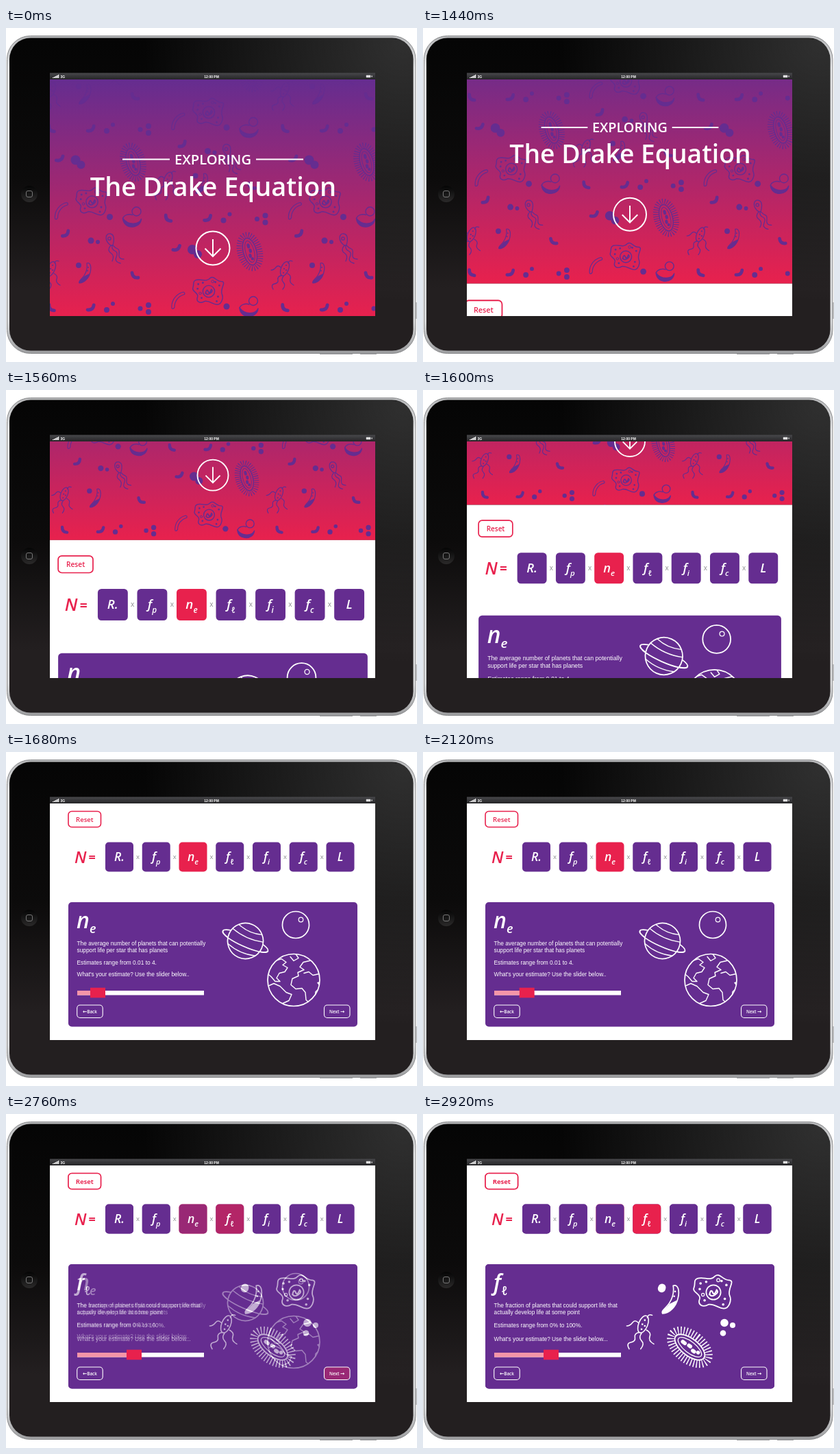
Animation of 600 by 487 pixels, one loop 3880 ms. Source, as an HTML page:

```html
<!DOCTYPE html>
<html lang="en">
<head>
<meta charset="utf-8">
<title>Exploring the Drake Equation</title>
<style>
  html, body { margin: 0; width: 100%; height: 100%; overflow: hidden; background: #fff; }
  svg { display: block; width: 100%; height: 100%; font-family: "Open Sans", "Noto Sans", sans-serif; }
  .line { fill: none; stroke: currentColor; stroke-linecap: round; stroke-linejoin: round; }
  .mid { text-anchor: middle; }
  .math { font-style: italic; font-weight: 600; fill: #fff; }
  .copy { font: 8.35px "Liberation Sans", Arial, sans-serif; fill: #fff; }
  .arrow { font-family: "DejaVu Sans", sans-serif; font-size: 7.5px; }
</style>
</head>
<body>
<svg viewBox="0 0 600 487">
  <defs>
    <linearGradient id="sky" x2="0" y2="1"><stop stop-color="#652d90"/><stop offset="1" stop-color="#e8214d"/></linearGradient>
    <linearGradient id="steel" x2="0" y2="1"><stop stop-color="#b4b5b7"/><stop offset=".1" stop-color="#e4e5e6"/><stop offset=".9" stop-color="#d8d9da"/><stop offset="1" stop-color="#9c9d9f"/></linearGradient>
    <linearGradient id="glass" x2="0" y2="1"><stop stop-color="#050505"/><stop offset=".45" stop-color="#0c0b0b"/><stop offset=".8" stop-color="#231f20"/></linearGradient>
    <radialGradient id="gloss" gradientUnits="userSpaceOnUse" cx="580" cy="20" r="380"><stop stop-color="#fff" stop-opacity=".17"/><stop offset="1" stop-color="#fff" stop-opacity="0"/></radialGradient>
    <linearGradient id="bar" x2="0" y2="1"><stop stop-color="#48484b"/><stop offset="1" stop-color="#252527"/></linearGradient>
    <linearGradient id="home" x2="0" y2="1"><stop stop-color="#050505"/><stop offset="1" stop-color="#2b2a2a"/></linearGradient>
    <clipPath id="screen"><path d="M64 75H539V420H64Z"/></clipPath>
    <clipPath id="globe"><circle r="38"/></clipPath>

    <g id="amoeba" class="line" stroke-width="1.5">
      <path d="M-20-17C-12-20-4-13 2-20C8-25 12-14 20-15C27-14 17-4 20 4C23 10 19 20 13 20C6 20 2 14-6 15C-13 19-20 16-17 8C-15 2-27 0-24-6C-22-11-25-15-20-17Z"/>
      <circle r="9"/>
      <path d="M-5 3q2-8 4-3t5-3q3 3-2 6t-6 0" stroke-width="1.8"/>
      <path d="M-16-11h.1M-9-13h.1M10-14h.1M16-9h.1M14 8h.1M12 15h.1M-11 10h.1M-17-4h.1" stroke-width="3"/>
      <circle cx="6" cy="-15" r="2" stroke-width="1"/><circle cx="-13" cy="3" r="1.8" stroke-width="1"/>
    </g>
    <g id="spiny" class="line" stroke-width="1.4">
      <ellipse rx="14" ry="24.5" stroke-width="9" stroke-dasharray="1.1 2.2" stroke-linecap="butt"/>
      <ellipse rx="9.5" ry="20"/>
      <ellipse rx="6.3" ry="16" stroke-width="1"/>
      <path d="M0-10v3M1-2v2M-1 5v2M1 11v.1" stroke-width="4.2"/>
    </g>
    <g id="swimmer" class="line" stroke-width="1.3">
      <ellipse cx="2" cy="-7" rx="5.5" ry="11" transform="rotate(22 2 -7)"/>
      <path d="M4-12h.1M1-7h.1M4-5h.1M0-1h.1" stroke-width="2.2"/>
      <path d="M-3 3q-6 1-5 6t-5 6t-2 8M0 4q-4 5 0 9t-1 10M-4-9q-4-4-7 0t-7 4M6 0q6 3 4 8t5 9M7-15q1-5 6-3"/>
    </g>
    <g id="tadpole" class="line" stroke-width="1.3">
      <path d="M-4-2C-14-9-12-20-5-19S1-9-1-2Z"/><circle cx="-6" cy="-12" r="2.2"/>
      <path d="M-4-2q-6 7 0 11t2 12M-2-2q-1 6 4 8t2 9t6 9M-1-2q4 4 7 5t2 8t7 7"/>
    </g>
    <g id="rod">
      <circle cx="-9" cy="-11" r="4" fill="currentColor"/>
      <path class="line" stroke-width="1.2" d="M3-14C8-16 10-9 8-1C6 8-1 15-8 15C-10 12-4 9-1 4C3-2 4-8 3-14Z"/>
      <path fill="currentColor" d="M7 1C5 9-2 15-8 15C-10 12-4 10-1 5Z"/>
      <path class="line" stroke-width="1.8" d="M5-8h.1M4-3h.1"/>
    </g>
    <g id="bud" class="line" stroke-width="1.4">
      <circle cy="-6" r="6.5"/><path d="M-20 4C-18-1-11-3-6-1"/>
      <path fill="currentColor" d="M-20 4C-19 21 6 20 7 5C4 13-12 15-20 4Z"/>
    </g>
    <path id="tube" class="line" stroke-width="1.2" d="M-8 12C-9 1-1-9 9-11C12-10 11-7 9-7C2-5-4 2-4 11C-5 14-8 14-8 12Z"/>
    <path id="bean" class="line" stroke-width="4.8" d="M-4-4Q-3 4 5 3"/>
    <g id="colony"></g>
  </defs>

  <path d="M458 473h48v3h-48ZM517 473h24v3h-24ZM596 400h3.500v24h-3.500Z" fill="#a5a6a8"/>
  <rect x="1.500" y="11.500" width="596.500" height="463" rx="34" fill="url(#steel)" stroke="#8a8b8d"/>
  <rect x="5" y="14.500" width="589.500" height="456" rx="31" fill="url(#glass)"/>
  <path d="M145 15H564Q594 16 594 46V400L500 420Z" fill="url(#gloss)"/>
  <circle cx="34" cy="242" r="12" fill="url(#home)"/>
  <rect x="29.500" y="237.500" width="9" height="9" rx="2.500" fill="none" stroke="#777"/>

  <g clip-path="url(#screen)"><g id="page">
    <g id="hero" transform="translate(302 65) scale(.8587) translate(-302 -424)"></g>
    <g id="first"></g>
    <g id="second"></g>
  </g></g>

  <path d="M64 65.500H539V75H64Z" fill="url(#bar)"/>
  <path d="M68 72h1.500v1h-1.500ZM70 71h1.500v2h-1.500ZM72 70h1.500v3h-1.500ZM74 69h1.500v4h-1.500ZM76 68h1.200v5h-1.200Z" fill="#fff"/>
  <g fill="#fff" font-size="5" font-weight="700" font-family="Liberation Sans, Arial, sans-serif">
    <text x="79.500" y="72.500">3G</text><text class="mid" x="300" y="72.500">12:00 PM</text>
  </g>
  <path d="M526 69h6v3h-6ZM533.500 69.700h1v1.600h-1" fill="#ddd" stroke="#fff" stroke-width=".4"/>
</svg>
<script>
const PURPLE = '#652d90', RED = '#e8214d', LOOP = 3880, STEP = 40;
const $ = id => document.getElementById(id);
const use = (id, x, y, turn = 0, size = 1) =>
  `<use href="#${id}" transform="translate(${x} ${y}) rotate(${turn}) scale(${size})"/>`;
const dot = (x, y, r) => `<circle cx="${x}" cy="${y}" r="${r}" fill="currentColor"/>`;
const text = (x, y, size, str, attrs = '') => `<text x="${x}" y="${y}" font-size="${size}" ${attrs}>${str}</text>`;
const box = (x, y, w, h, attrs) => `<rect x="${x}" y="${y}" width="${w}" height="${h}" ${attrs}/>`;

$('colony').innerHTML =
  use('amoeba', 296, 384, 0, .96) + use('spiny', 356, 326, -15) + use('tadpole', 157, 319) + use('swimmer', 405, 358) +
  use('rod', 115, 357) + use('bud', 361, 404) + use('tube', 250, 396) +
  use('bean', 87, 300, -80) + use('bean', 188, 361) + use('bean', 249, 321, -70) +
  use('bean', 407, 408, 10) + use('bean', 465, 408, -75) +
  [[272, 323, 7], [280, 330, 6], [124, 310, 4.5], [134, 312, 3], [196, 409, 3.5], [208, 404, 4],
   [208, 414, 4], [322, 406, 4.5], [488, 411, 4], [497, 402, 3]].map(d => dot(...d)).join('');

// The colony repeats on a half-drop lattice.
let colonies = '';
for (let row = -3; row <= 1; row++)
  for (let col = -2; col <= 2; col++)
    colonies += use('colony', 170.5 * row + 341 * col, 130.5 * row);

$('hero').innerHTML = box(0, 75, 604, 349, 'fill="url(#sky)"') +
  `<g color="${PURPLE}">${colonies}</g>
   <g fill="#fff" class="mid" font-weight="600">
     ${text(302, 199, 20.2, 'EXPLORING')}${text(302.5, 244.5, 38, 'The Drake Equation')}</g>
   <g fill="none" stroke="#fff" stroke-width="2">
     <path d="M170 191.500H239M365 191.500H434M302 308V333M290.500 321.500L302 333L313.500 321.500"/>
     <circle cx="302" cy="321" r="24.500"/></g>`;

const planets = `<g class="line" stroke-width="1.7">
  <g transform="translate(349.500 275.500) rotate(24)">
    <ellipse rx="36" ry="8"/><circle r="26" fill="${PURPLE}"/>
    <path d="M-36 0C-36 11 36 11 36 0"/>
    <path d="M-24-9Q0-2 24-9M-18-18Q0-12 18-18M-22 14Q0 21 22 14" stroke-width="1.300"/>
  </g>
  <circle cx="423" cy="252" r="19.500"/><circle cx="430.500" cy="244.500" r="3.300" stroke-width="1.200"/>
  <g transform="translate(420 332.500)"><circle r="38"/>
    <path clip-path="url(#globe)" stroke-width="1.400" d="M-27-28l9-3 7 5-5 4 7 4-4 6-8 2-4 7 5 5-7 0-6-7-6-5
      M-38 9l9-4 9 4 9 9 8 3-4 9-9 4-3 8M27-29l-13 3-5 7 6 4-9 4 1 5-9 4-2 9 7 6 9-1 5 6 1 11 6 5 7-9 1-8 8-7-5-6 8-2 4 5
      M3-38l4 6-7 4-5-6M15-10l7-2 6 5 9-2"/>
  </g></g>`;

const microbes = use('rod', 361, 270, 0, 1.4) + dot(349, 253, 5.5) + use('amoeba', 424, 260, 0, 1.18) +
  use('swimmer', 319, 315, 0, 1.2) + use('spiny', 389.5, 340, -52, 1.3) +
  dot(440, 304.5, 5.8) + dot(452, 308, 4) + dot(438, 319.5, 4.3);

const symbols = [['R.'], ['f', 'p'], ['n', 'e'], ['f', 'ℓ'], ['f', 'i'], ['f', 'c'], ['L']];
const withSub = ([main, sub = ''], drop, size) => `${main}<tspan dy="${drop}" font-size="${size}">${sub}</tspan>`;
const arrow = glyph => `<tspan class="arrow">${glyph}</tspan>`;

function scene({ active, lines, rows, art, resetWeight, handle }) {
  const tiles = symbols.map((symbol, i) => {
    const x = 145 + 53.75 * i;
    return box(x, 131.5, 41, 43, `rx="5" fill="${i === active ? RED : PURPLE}"`) +
      text(x + 20.5, 159, 17.5, withSub(symbol, 5, 11), 'class="math mid"');
  }).join('');
  const button = (x, label, attrs) =>
    box(x, 369, 37.5, 18.5, `rx="4.5" stroke="#fff" stroke-width="1.100" ${attrs}`) +
    text(x + 18.7, 380.5, 6.3, label, 'class="mid" fill="#fff" font-weight="600"');
  return box(91, 86.5, 47.5, 23, `rx="5" fill="#fff" stroke="${RED}" stroke-width="1.600"`) +
    text(114.8, 102, 9.5, 'Reset', `class="mid" fill="${RED}" font-weight="${resetWeight}"`) + tiles +
    box(91, 219, 422, 181.5, `rx="5" fill="${PURPLE}"`) +
    text(103, 257, 32, withSub(symbols[active], 7, 18), 'class="math"') +
    lines.map((line, i) => `<text class="copy" x="103.500" y="${rows[i]}">${line}</text>`).join('') +
    `<g color="#fff">${art}</g>` +
    box(104, 348, 185, 6.5, 'fill="#fff"') +
    box(104, 348, handle - 104, 6.5, 'class="filled" fill="#f595a8"') +
    box(handle, 343.7, 22, 14.6, `class="handle" fill="${RED}"`) +
    button(103.7, arrow('←') + 'Back', 'fill="none"') +
    button(464.5, 'Next ' + arrow('→'), `class="next" fill="${RED}" fill-opacity="0"`);
}

const times = symbols.slice(1).map((_, i) => text(192.5 + 53.75 * i, 156, 9.5, 'x', 'class="mid" fill="#8b8b8f"')).join('');
$('first').innerHTML =
  box(0, 65, 604, 500, 'fill="#fff"') +
  text(100, 161.5, 24, 'N', `fill="${RED}" font-style="italic" font-weight="600"`) +
  text(120.5, 160, 18, '=', `fill="${RED}" font-weight="700"`) + times +
  scene({
    active: 2, art: planets, resetWeight: 600, handle: 123, rows: [281.5, 292, 310, 327],
    lines: ['The average number of planets that can potentially', 'support life per star that has planets',
      'Estimates range from 0.01 to 4.', "What's your estimate? Use the slider below.."]
  });
$('second').innerHTML = scene({
  active: 3, art: microbes, resetWeight: 700, handle: 176, rows: [281.5, 292, 311, 330.5],
  lines: ['The fraction of planets that could support life that', 'actually develop life at some point',
    'Estimates range from 0% to 100%.', "What's your estimate? Use the slider below..."]
});

const part = name => $('first').querySelector('.' + name);
const handle = part('handle'), filled = part('filled'), next = part('next');
// Fraction done of a linear move that takes `count` ticks, the first one at `start` ms.
const progress = (tick, start, count) => Math.min(1, Math.max(0, (tick - start / STEP + 1) / count));

function draw() {
  const tick = Math.floor(performance.now() % LOOP / STEP);
  const left = 1 - progress(tick, 1440, 7);
  const x = 123 + 53 * progress(tick, 2120, 3);
  const fade = progress(tick, 2560, 10);
  $('page').setAttribute('transform',
    `translate(302 ${65 + 359 * left}) scale(${1 + .1645 * left}) translate(-302 -65)`);
  handle.setAttribute('x', x);
  filled.setAttribute('width', x - 104);
  next.setAttribute('fill-opacity', progress(tick, 2440, 3));
  $('second').setAttribute('opacity', fade);
  $('second').setAttribute('visibility', fade ? 'visible' : 'hidden');
  requestAnimationFrame(draw);
}
draw();
</script>
</body>
</html>
```
